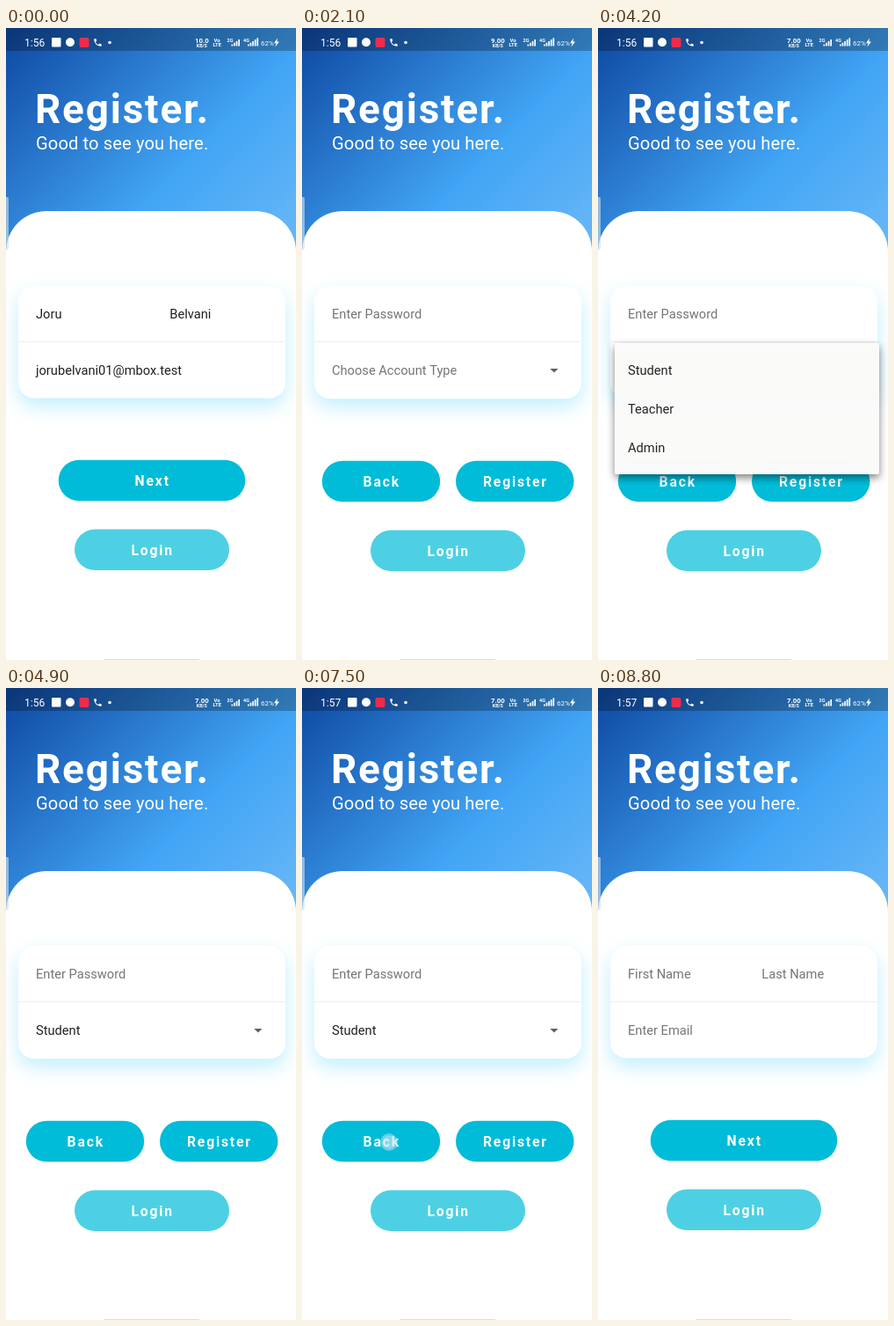
Recreate the animation shown at these times as an HTML page with a canvas. Size 330x718 px, loop 8.9 s.

```html
<!DOCTYPE html>
<html lang="en">
<head>
<meta charset="utf-8">
<title>Register form</title>
<style>
html, body { margin: 0; width: 330px; height: 718px; overflow: hidden; background: #fff; }
canvas { display: block; width: 330px; height: 718px; }
</style>
</head>
<body>
<canvas width="330" height="718"></canvas>
<script>
const ctx = document.querySelector('canvas').getContext('2d');
const LOOP = 8900;
const INK = '#212121', HINT = '#757575', CYAN = '#00bcd8', PALE_CYAN = '#4dd0e4';
const TO_PAGE_2 = 1800, MENU_OPEN = 3040, MENU_CLOSE = 4200, TO_PAGE_1 = 7600;
const MENU_ITEMS = ['Student', 'Teacher', 'Admin'];
const TOUCHES = [
  { from: 1600, to: 1800, x: 168, y: 516 },
  { from: 2800, to: 3020, x: 200, y: 390 },
  { from: 3950, to: 4180, x: 100, y: 390 },
  { from: 7350, to: 7600, x: 99, y: 516 },
];
const PHONE = new Path2D('M6.6 10.8c1.4 2.8 3.8 5.1 6.6 6.6l2.2-2.2c.3-.3.7-.4 1-.2 1.1.4 2.3.6 3.6.6.6 0 1 .4 1 1V20c0 .6-.4 1-1 1-9.4 0-17-7.6-17-17 0-.6.4-1 1-1h3.5c.6 0 1 .4 1 1 0 1.2.2 2.4.6 3.6.1.3 0 .7-.3 1z');

const progress = (t, from, to) => Math.min(1, Math.max(0, (t - from) / (to - from)));

function text(str, x, y, { size = 14.67, weight = 400, color = INK, spacing = 0, align = 'left' } = {}) {
  ctx.font = `${weight} ${size}px Roboto, sans-serif`;
  ctx.letterSpacing = spacing + 'px';
  ctx.textAlign = align;
  ctx.fillStyle = color;
  ctx.fillText(str, x, y);
}

function box(x, y, w, h, radius, color, shadow) {
  ctx.save();
  if (shadow) {
    [ctx.shadowOffsetY, ctx.shadowBlur, ctx.shadowColor] = shadow;
  }
  ctx.fillStyle = color;
  ctx.beginPath();
  ctx.roundRect(x, y, w, h, radius);
  ctx.fill();
  ctx.restore();
}

function polygon(color, ...points) {
  ctx.fillStyle = color;
  ctx.beginPath();
  points.forEach(([x, y]) => ctx.lineTo(x, y));
  ctx.fill();
}

function dot(x, y, r, color) {
  ctx.fillStyle = color;
  ctx.beginPath();
  ctx.arc(x, y, r, 0, 2 * Math.PI);
  ctx.fill();
}

function button(label, x, y, w, color = CYAN) {
  box(x, y, w, 46.5, 23.25, color);
  text(label, x + w / 2 + 0.7, y + 29, { size: 15.7, weight: 700, color: '#fff', spacing: 1.83, align: 'center' });
}

function drawBackdrop() {
  const blue = ctx.createLinearGradient(20, -20, 310, 270);
  blue.addColorStop(0, '#0d47a1');
  blue.addColorStop(0.62, '#42a5f5');
  blue.addColorStop(0.95, '#64b5f6');
  box(0, 0, 330, 270, 0, blue);
  box(0, 0, 330, 26, 0, 'rgba(0,0,0,.25)');
  text('Register.', 33, 108, { size: 45.83, weight: 700, color: '#fff', spacing: 1.83 });
  text('Good to see you here.', 34, 137.5, { size: 20.17, color: '#fff', spacing: 0.1 });
  box(0, 208, 330, 510, [46, 46, 0, 0], '#fff');
  box(0, 192, 3, 60, [0, 2, 2, 0], 'rgba(205,220,232,.65)');
  box(111, 717, 109, 1, 0, '#dedede');
}

function signal(label, x, count) {
  text(label, x, 16, { size: 5.5, weight: 700, color: '#fff' });
  for (let i = 0; i < count; i++) {
    box(x + 5 + i * 2.6, 18.5 - i * 1.8, 1.7, 2 + i * 1.8, 0, '#fff');
  }
}

function drawStatusBar(t) {
  const white = { color: '#fff' };
  const small = { ...white, weight: 700, align: 'center' };
  text(t < 6000 ? '1:56' : '1:57', 21, 20.8, { ...white, size: 12 });
  box(52, 11, 10.5, 10.5, 1, '#fff');
  dot(73, 16.3, 5, '#fff');
  box(83.5, 11, 11, 11, 2, '#ee2b4c');
  ctx.save();
  ctx.translate(98.8, 10.8);
  ctx.scale(0.47, 0.47);
  ctx.fillStyle = '#fff';
  ctx.fill(PHONE);
  ctx.restore();
  dot(118, 16.5, 1.8, '#fff');
  const speed = t < 700 ? '10.0' : t < 3800 ? '9.00' : '7.00';
  text(speed, 222.8, 16.8, { ...small, size: 7.8 });
  text('KB/S', 222.8, 22.4, { ...small, size: 5.4 });
  text('Vo', 240, 16, { ...small, size: 6 });
  text('LTE', 240.3, 21.3, { ...small, size: 6 });
  signal('2G', 251.5, 4);
  signal('4G', 270, 5);
  text('62%', 290, 19.8, { ...white, size: 8 });
  polygon('#fff', [309, 11.5], [305, 17.2], [307.5, 17.2], [306.3, 21.5], [311, 15.4], [308.3, 15.4]);
}

function drawCard(height) {
  box(14, 293, 304, height, 18, '#fff', [9, 21, 'rgba(0,190,255,.25)']);
  box(14, 356, 304, 1, 0, '#eeeeee');
}

function drawNamePage(first, last, email, color) {
  drawCard(127.5);
  text(first, 34, 330, { color });
  text(last, 186.3, 330, { color });
  text(email, 34, 394, { color });
  button('Next', 59.7, 490.7, 212.6);
  button('Login', 78, 569.5, 176, PALE_CYAN);
}

function drawAccountPage(t) {
  const chosen = t >= MENU_CLOSE;
  drawCard(128.3);
  text('Enter Password', 34, 330, { color: HINT });
  text(chosen ? 'Student' : 'Choose Account Type', 34, 394, { color: chosen ? INK : HINT });
  polygon('#616161', [282.3, 387], [291.5, 387], [286.9, 391.6]);
  button('Back', 22.8, 491.7, 134.4);
  button('Register', 175, 491.7, 134.4);
  button('Login', 78, 570.5, 176, PALE_CYAN);
}

// The sheet fades in, unfolds from its first row, then its rows fade in one by one.
function drawMenu(t) {
  const alpha = progress(t, MENU_OPEN, MENU_OPEN + 75) * (1 - progress(t, MENU_CLOSE, MENU_CLOSE + 75));
  if (!alpha) return;
  const grow = progress(t, MENU_OPEN + 75, MENU_OPEN + 150);
  ctx.globalAlpha = alpha;
  box(19, 366 - 8 * grow, 301, 44 + 105 * grow, 2, '#fbfbfa', [4, 10, 'rgba(0,0,0,.5)']);
  MENU_ITEMS.forEach((item, i) => {
    const start = MENU_OPEN + 183 + i * 33;
    ctx.globalAlpha = alpha * progress(t, start, start + 50);
    text(item, 34, 394 + i * 44);
  });
  ctx.globalAlpha = 1;
}

function draw(t) {
  drawBackdrop();
  drawStatusBar(t);
  if (t < TO_PAGE_2) {
    drawNamePage('Joru', 'Belvani', 'jorubelvani01@mbox.test', INK);
  } else if (t < TO_PAGE_1) {
    drawAccountPage(t);
    drawMenu(t);
  } else {
    drawNamePage('First Name', 'Last Name', 'Enter Email', HINT);
  }
  for (const { from, to, x, y } of TOUCHES) {
    if (t < from || t >= to) continue;
    dot(x, y, 10, 'rgba(190,225,240,.5)');
    dot(x, y, 7.5, 'rgba(215,235,245,.35)');
  }
}

const begin = performance.now();
function tick() {
  draw((performance.now() - begin) % LOOP);
  requestAnimationFrame(tick);
}
tick();
</script>
</body>
</html>
```
